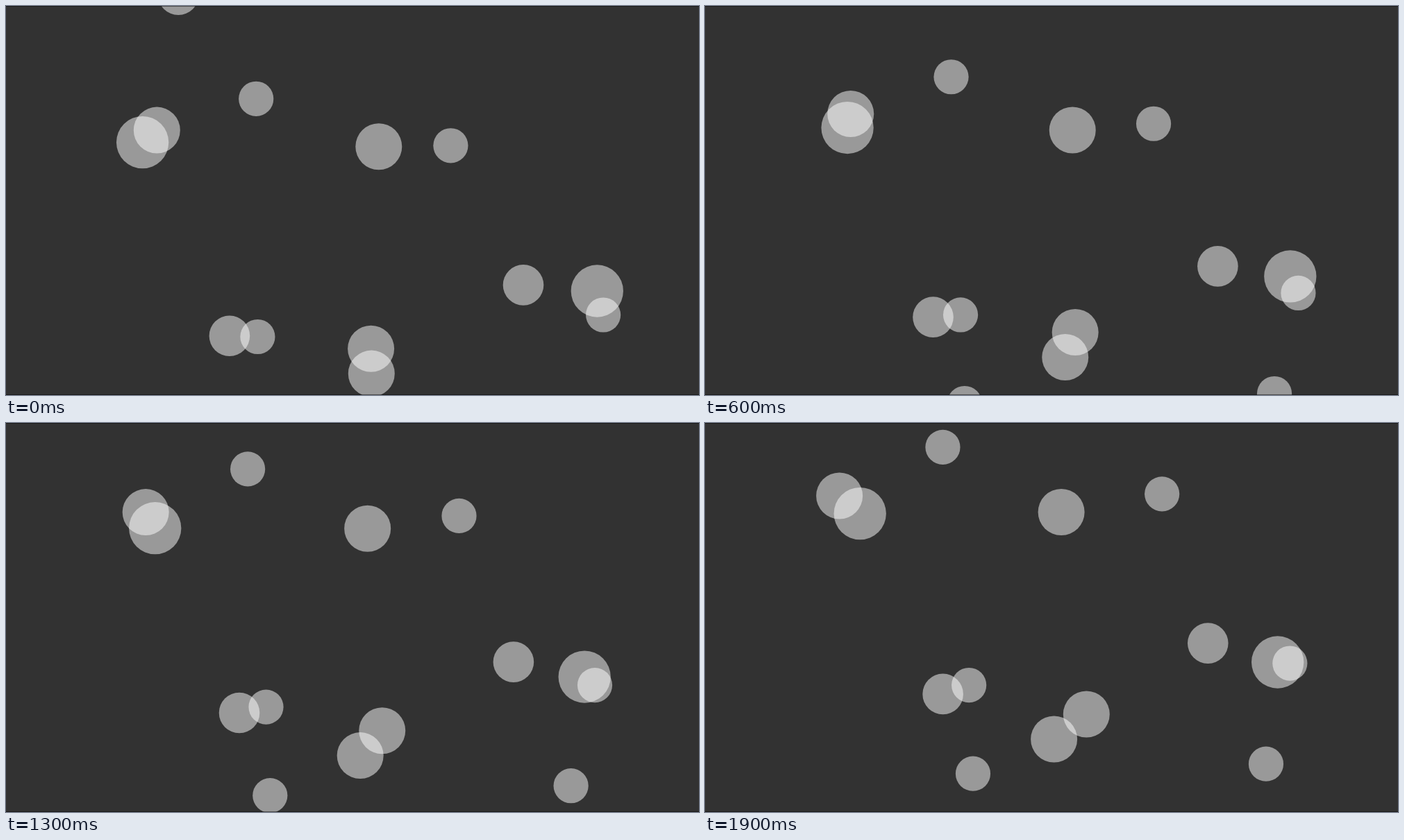
Recreate the animation shown at these times as an HTML page with a canvas. Size 998 by 561 pixels, loop 2 s.

```html
<!DOCTYPE html>
<html lang="en">
<head>
<meta charset="utf-8">
<title>Rising bubbles</title>
<style>
  html, body { margin: 0; width: 100%; height: 100%; overflow: hidden; background: #323232; }
  canvas { display: block; width: 100%; height: 100%; }
</style>
</head>
<body>
<canvas id="stage" width="998" height="561"></canvas>
<script>
const WIDTH = 998, HEIGHT = 561;
const LOOP = 2000, STEP = 100;
const TICKS_PER_STEP = 11 / 3;
const S = 25.1, M = 29.3, L = 33.5, XL = 37.65;

// x, y, radius, horizontal direction
const bubbles = [
  [196.6, 196.6, XL, 1],
  [217.3, 179.1, L, -1],
  [360.2, 133.8, S, -1],
  [536.8, 202.7, L, -1],
  [640.4, 201.3, S, 1],
  [745, 402.4, M, -1],
  [851.3, 411, XL, -1],
  [860.1, 445.5, S, -1],
  [321.9, 475.7, M, 1],
  [362.4, 477, S, 1],
  [525.6, 494.2, L, 1],
  [526.3, 530.1, L, -1],
  [368.2, 604.6, S, 1],
  [825.7, 590.6, S, -1],
  [248.2, -16.2, M, -1]
];

const ctx = document.getElementById("stage").getContext("2d");

function draw(ticks) {
  ctx.fillStyle = "#323232";
  ctx.fillRect(0, 0, WIDTH, HEIGHT);

  // Small bubbles rise faster, large ones drift sideways more.
  ctx.fillStyle = "rgba(255, 255, 255, 0.5)";
  for (const [x, y, r, dir] of bubbles) {
    ctx.beginPath();
    ctx.arc(x + dir * 0.01025 * r * ticks, y - 36 / r * ticks, r, 0, 2 * Math.PI);
    ctx.fill();
  }

  ctx.fillStyle = "rgba(0, 0, 0, 0.5)";
  ctx.fillRect(0, 0, WIDTH, 1);
  ctx.fillRect(0, HEIGHT - 1, WIDTH, 1);
}

const start = performance.now();

function play() {
  const time = Math.max(0, performance.now() - start) % LOOP;
  draw(Math.floor(Math.floor(time / STEP) * TICKS_PER_STEP + 1e-6));
  requestAnimationFrame(play);
}

play();
</script>
</body>
</html>
```
